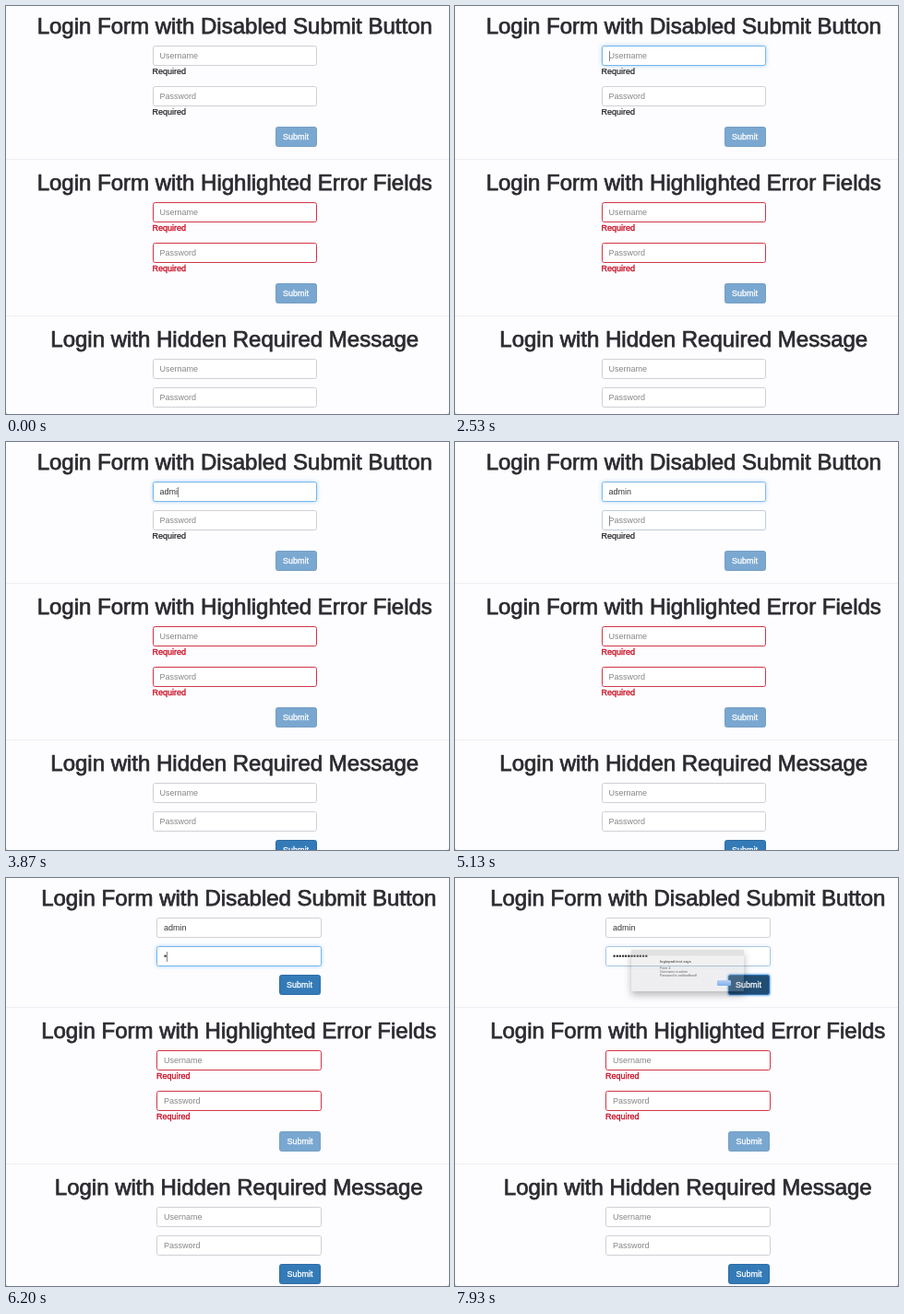
An HTML page for the animation above (8000 ms loop, 480 by 443 pixels).

```html
<!DOCTYPE html>
<html lang="en">
<head>
<meta charset="utf-8">
<title>Login forms</title>
<style>
  html, body {
    margin: 0;
    width: 100%;
    height: 100%;
    overflow: hidden;
    background: #c4c4c6;
  }
  .stage {
    position: relative;
    width: 480px;
    height: 443px;
    overflow: hidden;
    border-radius: 0 0 3px 3px;
    background: #fdfdff;
    color: #111;
    font: 9px/12px "Liberation Sans", Arial, sans-serif;
    white-space: nowrap;
  }
  .page, section, .group, h1, hr, .field, .req, .btn, .menu, .dialog, .dialog * {
    position: absolute;
    margin: 0;
    box-sizing: border-box;
  }
  .page, section, .group { left: 0; top: 0; }
  section:nth-of-type(2) { top: 170px; }
  section:nth-of-type(3) { top: 340px; }

  h1 {
    left: 0;
    top: 8px;
    width: 495.5px;
    text-align: center;
    font: 24px/28px "Liberation Sans", Arial, sans-serif;
    color: #2c2b30;
    -webkit-text-stroke: .75px #2c2b30;
  }
  hr {
    left: -10px;
    top: 166px;
    width: 500px;
    height: 1px;
    border: 0;
    background: #f0f0f2;
  }
  .field {
    left: 158.5px;
    top: 43px;
    width: 178.5px;
    height: 22px;
    padding-left: 7px;
    display: flex;
    align-items: center;
    border: 1px solid #d0d0d5;
    border-radius: 2.6px;
    background: #fff;
    color: #343438;
  }
  .second { top: 87px; }
  .short .second { top: 74px; }
  .hint { position: absolute; left: 7px; color: #86868a; }
  .typed:not(:empty) ~ .hint { display: none; }
  .caret { width: 1px; height: 11px; background: #888; visibility: hidden; }
  .req { left: 158.5px; top: 65px; -webkit-text-stroke: .15px currentColor; }
  .req.low { top: 109px; }
  .error .field { border-color: #d03546; }
  .error .req { color: #cb0a20; -webkit-text-stroke-width: .3px; }
  .btn {
    left: 291.5px;
    top: 131px;
    width: 45px;
    height: 22px;
    border: 1px solid #2e6da4;
    border-radius: 2.6px;
    background: #337ab7;
    color: #fff;
    text-align: center;
    line-height: 20px;
    -webkit-text-stroke: .3px #fff;
  }
  .off { opacity: .65; }
  .short .btn { top: 105px; }

  .menu {
    left: 158.5px;
    top: 64px;
    width: 178.5px;
    height: 33px;
    padding: 2px 0 0 5px;
    border: 1px solid #bccbd9;
    background: #fff;
    color: #000;
    font-weight: bold;
    line-height: 15px;
  }
  .dialog {
    left: 191px;
    top: 78px;
    width: 122px;
    height: 45px;
    background: linear-gradient(rgba(170, 170, 170, .35) 6px, rgba(190, 190, 190, .22) 7px);
    box-shadow: 0 4px 8px rgba(0, 0, 0, .28);
    color: rgba(50, 50, 50, .75);
    font-size: 3.5px;
    line-height: 4px;
  }
  .dialog b { left: 31px; top: 11px; font-size: 3.9px; }
  .dialog p { left: 31px; top: 18px; }
  .dialog i {
    left: 93px;
    top: 33px;
    width: 15px;
    height: 6px;
    border-radius: 1px;
    background: linear-gradient(#b4d2f5, #7fb0ee);
  }

  /* One shared 8 s cycle: percentages are time / 80 ms. */
  .page { animation: widen 8s step-end infinite; }
  .user { animation: glow-user 8s linear infinite; }
  .pass { animation: glow-pass 8s linear infinite; }
  .user .caret { animation: blink-user 8s step-end infinite; }
  .pass .caret { animation: blink-pass 8s step-end infinite; }
  .req-user { animation: hide-user 8s step-end infinite; }
  .req-pass { animation: hide-pass 8s step-end infinite; }
  .group { animation: lift-once 8s step-end infinite; }
  .lift { animation: lift-twice 8s step-end infinite; }
  .btn.live { animation: lift-twice 8s step-end infinite, press 8s step-end infinite; }
  .menu { animation: menu 8s step-end infinite; }
  .dialog { animation: dialog 8s step-end infinite; }

  @keyframes widen { 0% { left: 0; } 77.06%, 100% { left: 4.5px; } }
  @keyframes lift-once { 0% { margin-top: 0; } 40.44%, 100% { margin-top: -13px; } }
  @keyframes lift-twice {
    0% { margin-top: 0; }
    40.44% { margin-top: -13px; }
    77.06%, 100% { margin-top: -25.6px; }
  }
  @keyframes hide-user { 0% { visibility: visible; } 40.44%, 100% { visibility: hidden; } }
  @keyframes hide-pass { 0% { visibility: visible; } 77.06%, 100% { visibility: hidden; } }
  @keyframes glow-user {
    0%, 28.38%, 65.75%, 100% { border-color: #d0d0d5; box-shadow: 0 0 4px rgba(102, 175, 233, 0); }
    30.25%, 63.88% { border-color: #74b6ea; box-shadow: 0 0 4px rgba(102, 175, 233, .55); }
  }
  @keyframes glow-pass {
    0%, 63.88%, 99.88%, 100% { border-color: #d0d0d5; box-shadow: 0 0 4px rgba(102, 175, 233, 0); }
    65.75%, 98% { border-color: #74b6ea; box-shadow: 0 0 4px rgba(102, 175, 233, .55); }
  }
  @keyframes blink-user {
    0%, 35%, 56.25%, 63.88%, 100% { visibility: hidden; }
    28.38%, 40.44%, 62.88% { visibility: visible; }
  }
  @keyframes blink-pass {
    0%, 70.5%, 95.13%, 100% { visibility: hidden; }
    63.88%, 77.06% { visibility: visible; }
  }
  @keyframes menu {
    0%, 40.44%, 100% { visibility: hidden; }
    35.81% { visibility: visible; }
  }
  @keyframes press {
    0% { opacity: .65; }
    77.06% { opacity: 1; background: #337ab7; border-color: #2e6da4; box-shadow: none; }
    98%, 100% {
      opacity: 1;
      background: #204d74;
      border-color: #2f6fae;
      box-shadow: 0 0 2px 1px #86b9e8;
    }
  }
  @keyframes dialog { 0% { visibility: hidden; } 98.75%, 100% { visibility: visible; } }
</style>
</head>
<body>
<main class="stage">
  <div class="page">
    <section>
      <h1>Login Form with Disabled Submit Button</h1>
      <div class="field user"><span class="typed"></span><span class="caret"></span><span class="hint">Username</span></div>
      <div class="req req-user">Required</div>
      <div class="group">
        <div class="field second pass"><span class="typed"></span><span class="caret"></span><span class="hint">Password</span></div>
        <div class="req low req-pass">Required</div>
      </div>
      <div class="btn live">Submit</div>
      <hr class="lift">
    </section>
    <section class="error lift">
      <h1>Login Form with Highlighted Error Fields</h1>
      <div class="field"><span class="hint">Username</span></div>
      <div class="req">Required</div>
      <div class="field second"><span class="hint">Password</span></div>
      <div class="req low">Required</div>
      <div class="btn off">Submit</div>
      <hr>
    </section>
    <section class="short lift">
      <h1>Login with Hidden Required Message</h1>
      <div class="field"><span class="hint">Username</span></div>
      <div class="field second"><span class="hint">Password</span></div>
      <div class="btn">Submit</div>
    </section>
    <div class="menu">f<br>1</div>
  </div>
  <div class="dialog">
    <b>loginpad.test says</b>
    <p>Form 1:<br>Username is admin<br>Password is asdfasdfasdf</p>
    <i></i>
  </div>
</main>
<script>
  const LOOP = 8000;
  const inputs = [
    { el: document.querySelector('.user .typed'), text: 'admin', keys: [3235, 3365, 3500, 3835, 3970] },
    { el: document.querySelector('.pass .typed'), text: '•'.repeat(12), keys: Array.from({ length: 12 }, (_, i) => 6165 + 80 * i) }
  ];
  let start;

  function draw(now) {
    start ??= now;
    const t = (now - start) % LOOP;
    for (const { el, text, keys } of inputs) {
      const shown = text.slice(0, keys.filter(k => k <= t).length);
      if (el.textContent !== shown) el.textContent = shown;
    }
    requestAnimationFrame(draw);
  }
  requestAnimationFrame(draw);
</script>
</body>
</html>
```
